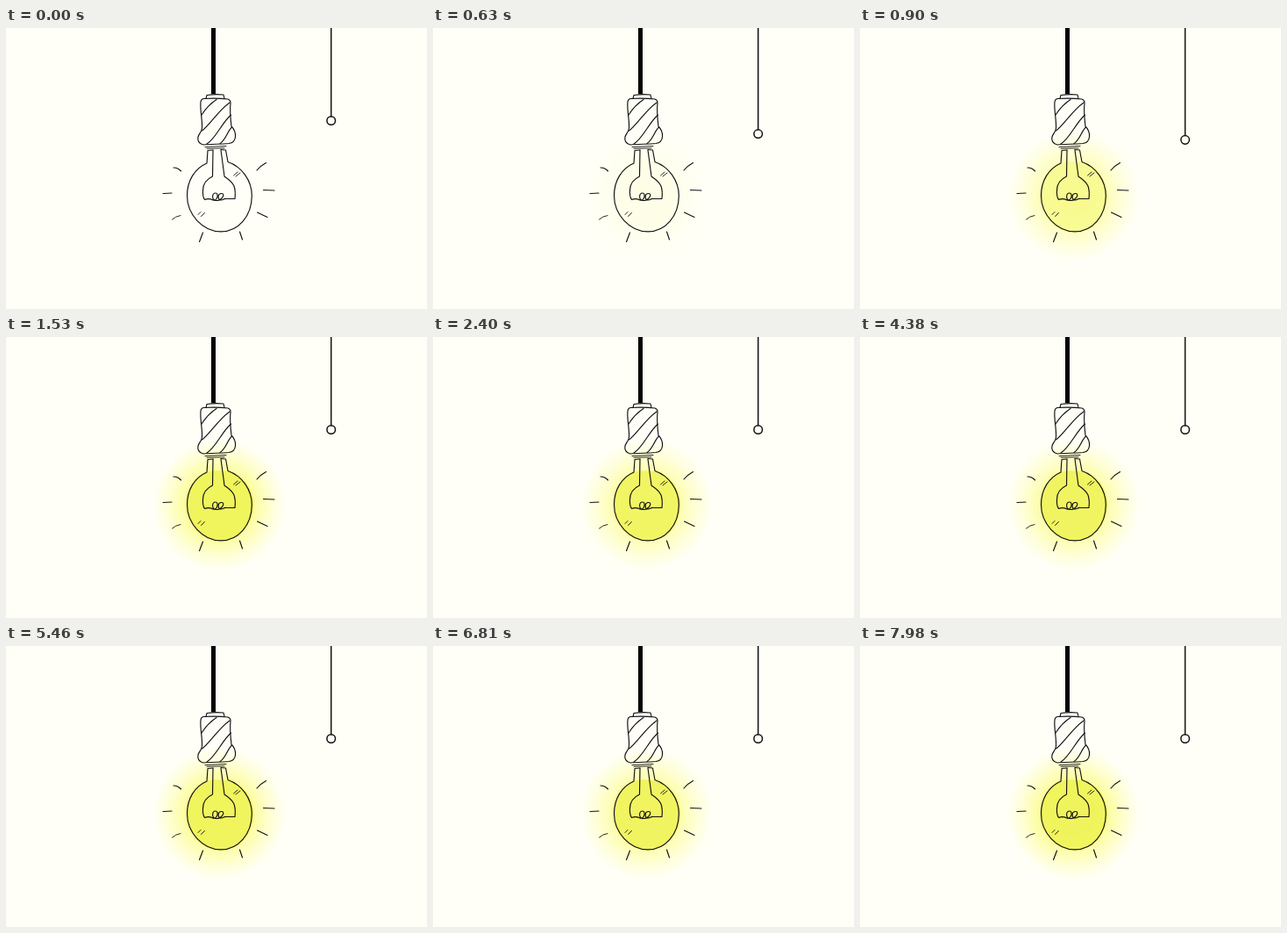
These frames come from a looping animation (480 px wide and 320 px high, 8 s). An HTML page:

```html
<!DOCTYPE html>
<html lang="en">
<head>
<meta charset="utf-8">
<title>Light bulb</title>
<style>
  html, body { margin: 0; width: 100%; height: 100%; overflow: hidden; background: #fffff8; }
  svg { display: block; width: 100vw; height: 100vh; }
  .ink { fill: none; stroke: #111; stroke-width: 1.15; stroke-linecap: round; stroke-linejoin: round; }
  .thin { stroke-width: .9; }
  .pull { stroke-width: 1.5; }
</style>
</head>
<body>
<svg viewBox="0 0 480 320">
  <defs>
    <radialGradient id="glow">
      <stop offset="0" stop-color="#fbfb70" stop-opacity=".9"/>
      <stop offset=".5" stop-color="#fcfc84" stop-opacity=".85"/>
      <stop offset=".68" stop-color="#fdfda0" stop-opacity=".64"/>
      <stop offset=".86" stop-color="#fefeb8" stop-opacity=".32"/>
      <stop offset="1" stop-color="#ffffd8" stop-opacity="0"/>
    </radialGradient>
  </defs>

  <circle id="halo" cx="243.5" cy="191" r="78" fill="url(#glow)"/>
  <path id="bulb" d="M230 153.5Q241 151 255 153.5C271 158 282 173 282 191C282 214 265 232 244.5 232C223 232 207 214 207 191C207 174 215 160 230 153.5Z" fill="#f0f45c"/>

  <!-- cord and socket -->
  <path d="M236.5 0V75" stroke="#000" stroke-width="5"/>
  <g class="ink">
    <path d="M228 80.5L229 76.5Q238 75 248 76L249 80.5"/>
    <path d="M225 80.5Q240 79.5 253 81Q256 82 256 85C255 95 256 104 257 112C260 115 262 119 261.5 124C261 129 258 131 254 131.5C244 132.5 234 132 225 133C220 132 218 128 219 124C220 120 223 119 223.5 114C224 103 221 94 222 84Q222.5 81 225 80.5Z"/>
    <path d="M223 99Q230 88 240 81.500M223.500 117C232 111 242 94 255 85M229 132C239 126 246 108 256.500 99M244 131.500C251 127 252 118 257.500 113"/>
    <path class="thin" d="M227 135.500L251 134.500M229 137.300L249 136.800"/>
  </g>

  <!-- glass, stem and filament -->
  <g class="ink">
    <path d="M236 139L230 139.5L229 154C215 160 206.5 174 206.5 191C206.5 212 224 231.8 245 231.8C265 231.8 280.300 214 280.300 191C280.300 174 269 158 253 152.5L250.5 139L245 138.5"/>
    <path d="M236 139L235.5 169C229 172 224.5 178 224.5 185Q224 192 226.5 195.5C230 194 233 194.500 236 196C241 197.500 243 188 239 188C234.500 188 234.500 196 239 196.500C246 197 250.500 189 246 188.500C241 188 241 196 245 196C248 196 249 193.500 251 194.500L261 194.500Q262 186 260 180C257 174 253 172 249 169L245 139"/>
    <path class="thin" d="M259.500 168L264 164M262 169L267 165M222.500 214.500L226.500 210.500M219 212.500L222 209.500"/>
  </g>

  <!-- rays -->
  <path class="ink" d="M191 159Q196 159 199.5 163M179 188.5L189 188M220.500 243.5L224.500 233M266.5 232L269.5 241M286.5 210L298 215.5M293.5 184.5L306 185M286 162Q290 157 296.5 153.5"/>
  <path class="ink thin" d="M189.5 218Q193 214.500 199 213.5"/>

  <!-- pull switch -->
  <path id="string" class="ink pull"/>
  <circle id="knob" class="ink pull" cx="370.7" r="4.8"/>
</svg>
<script>
  const set = (id, name, value) => document.getElementById(id).setAttribute(name, value);
  const clamp = x => Math.max(0, Math.min(1, x));
  const LOOP = 8000, BREATH = 2430, LIT = 1100;

  function draw(t) {
    const pull = Math.sin(Math.PI * clamp((t - 240) / 1260)) ** 2;
    const y = 105.5 + 22 * pull;
    set('string', 'd', `M370.7 0V${y - 4.8}`);
    set('knob', 'cy', y);

    const breath = Math.cos(2 * Math.PI * (t - LIT) / BREATH);
    const on = clamp((t - 560) / (LIT - 560));
    set('halo', 'opacity', on * (0.86 + 0.14 * breath));
    set('bulb', 'opacity', on ** 2 * (0.95 + 0.05 * breath));
  }

  const start = performance.now();
  function tick() {
    draw((performance.now() - start) % LOOP);
    requestAnimationFrame(tick);
  }
  tick();
</script>
</body>
</html>
```
